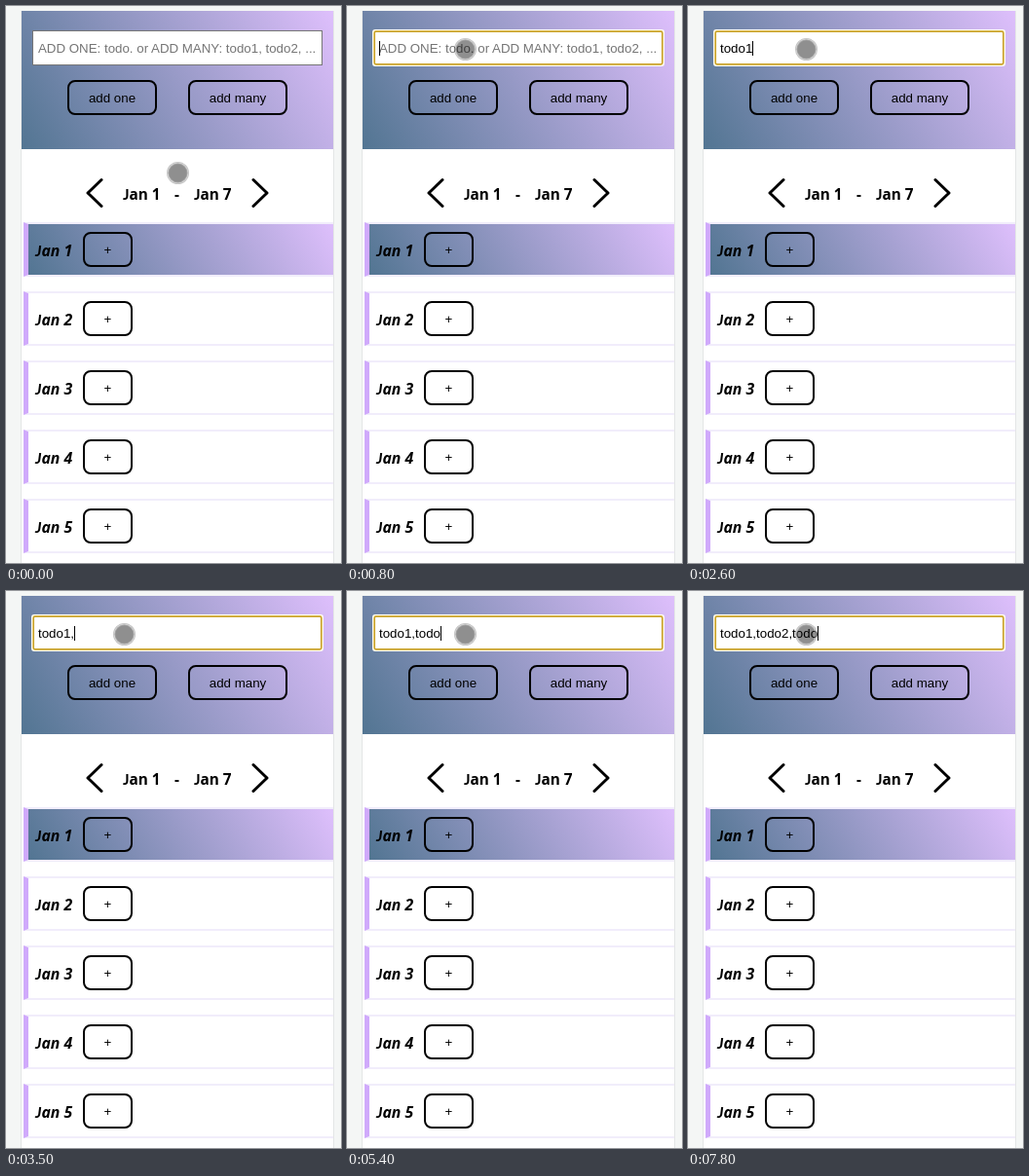
These frames come from a looping animation (344 by 572 pixels, 8 s). An HTML page:

```html
<!DOCTYPE html>
<html lang="en">
<head>
<meta charset="utf-8">
<title>Todo planner</title>
<style>
  html, body { margin: 0; width: 100%; height: 100%; overflow: hidden; background: #f4f6f5; }
  svg { display: block; width: 344px; height: 572px; }
  text { font: 13.33px "Liberation Sans", Arial, sans-serif; white-space: pre; }
  .date { font: bold 15.3px "Open Sans", "Noto Sans", sans-serif; }
  .day { font: italic bold 15.8px "Noto Sans", sans-serif; }
  .date .cap { font-family: Lato, sans-serif; }
  .mid { text-anchor: middle; }
  #hint { font-size: 13.3px; fill: #757575; }
  .button, .arrow { fill: none; stroke: #000; }
</style>
</head>
<body>
<svg id="stage" viewBox="0 0 344 572"></svg>
<script>
const LOOP = 8000, FRAME = 100;
const LEAVE = 200, RETURN = 700, FOCUS = 800;   // pointer hides, reappears, clicks the field
const BLINK = 500;
const TEXT = 'todo1,todo2,todo';
const KEY_TIMES = [1700, 1800, 2200, 2300, 2600, 3500, 4000, 4200,
                   5300, 5400, 5600, 6000, 7100, 7300, 7700, 7800];

// A rectangle filled with a 60 degree gradient that reaches its corners
function gradientBox(id, x, y, w, h) {
  const dx = Math.sin(Math.PI / 3), dy = Math.cos(Math.PI / 3);
  const cx = x + w / 2, cy = y + h / 2, r = (w * dx + h * dy) / 2;
  return `<linearGradient id="${id}" gradientUnits="userSpaceOnUse"
      x1="${cx - r * dx}" y1="${cy + r * dy}" x2="${cx + r * dx}" y2="${cy - r * dy}">
      <stop stop-color="#527592"/><stop offset="1" stop-color="#debffc"/>
    </linearGradient>
    <rect x="${x}" y="${y}" width="${w}" height="${h}" fill="url(#${id})"/>`;
}

function button(x, y, w, label) {
  return `<rect class="button" x="${x + 1}" y="${y + 1}" width="${w - 2}" height="34" rx="7" stroke-width="2"/>
    <text class="mid" x="${x + w / 2}" y="${y + 23}">${label}</text>`;
}

function date(x, y, number, style = '') {
  return `<text class="date ${style}" x="${x}" y="${y}"><tspan class="cap">J</tspan>an ${number}</text>`;
}

function dayRow(index) {
  const y = 222 + 71 * index;
  return `${index ? '' : gradientBox('today', 23, y + 2, 313, 52)}
    <path d="M18 ${y}H336v2H23zM18 ${y + 56}H336v-2H23z" fill="#f1edfb"/>
    <path d="M18 ${y}l5 2v52l-5 2z" fill="#d0aafb"/>
    ${date(30, y + 35, index + 1, 'day')}
    ${button(79, y + 10, 51, '+')}`;
}

const stage = document.getElementById('stage');
stage.innerHTML = `
  <rect x="15" y="5" width="322" height="567" fill="#e4e6e6"/>
  <rect x="16" y="5" width="320" height="567" fill="#fff"/>
  ${gradientBox('header', 16, 5, 320, 142)}
  <rect x="27.5" y="25.5" width="297" height="35" fill="#fff" stroke="#767676"/>
  <g id="focus">
    <rect x="26" y="24" width="300" height="38" rx="3" fill="#fffdf2"/>
    <rect x="28.2" y="26.2" width="295.6" height="33.6" rx="1.5" fill="#fff" stroke="#cba42a" stroke-width="1.7"/>
  </g>
  <text id="hint" x="33" y="48">ADD ONE: todo. or ADD MANY: todo1, todo2, ...</text>
  <text id="typed" x="33" y="48"></text>
  <rect id="caret" y="36" width="1" height="15"/>
  ${button(63, 76, 92, 'add one')}
  ${button(187, 76, 102, 'add many')}
  <path class="arrow" d="M98 178.500L84 192l14 13.500M254 178.500L268 192l-14 13.500"
    stroke-width="3" stroke-linecap="round" stroke-linejoin="round"/>
  ${date(120, 199, 1)}
  <text class="date" x="173" y="199">-</text>
  ${date(193, 199, 7)}
  ${[0, 1, 2, 3, 4].map(dayRow).join('')}
  <g id="pointer">
    <circle r="10" fill="#000" fill-opacity=".44"/>
    <circle r="10.5" fill="none" stroke="#000" stroke-opacity=".24" stroke-width="2"/>
    <circle r="10" fill="none" stroke="#fff" stroke-opacity=".35" stroke-width="1.5"/>
  </g>`;

const [focus, hint, typed, caret, pointer] =
  ['focus', 'hint', 'typed', 'caret', 'pointer'].map(id => document.getElementById(id));

const mix = (from, to, amount) => from + (to - from) * amount;
const show = (element, visible) => element.setAttribute('visibility', visible ? 'visible' : 'hidden');

function drawField(time) {
  const count = KEY_TIMES.filter(key => key <= time).length;
  const lastAction = count ? KEY_TIMES[count - 1] : FOCUS;
  const focused = time >= FOCUS;
  typed.textContent = TEXT.slice(0, count);
  show(focus, focused);
  show(hint, count === 0);
  show(caret, focused && (time - lastAction) % (2 * BLINK) < BLINK);
  caret.setAttribute('x', Math.round(33 + (count ? typed.getComputedTextLength() : 0)));
}

function drawPointer(time) {
  const progress = Math.min(1, Math.max(0, (time - LEAVE) / (FOCUS - LEAVE)));
  const travel = progress ** 2.5;
  show(pointer, time < LEAVE || time >= RETURN);
  pointer.setAttribute('transform',
    `translate(${mix(176.5, 121.5, travel)} ${mix(171.5, 44.5, travel)})`);
}

const start = performance.now();
function tick() {
  const elapsed = (performance.now() - start) % LOOP;
  const time = Math.floor(elapsed / FRAME) * FRAME;
  drawField(time);
  drawPointer(time);
  requestAnimationFrame(tick);
}
tick();
</script>
</body>
</html>
```
